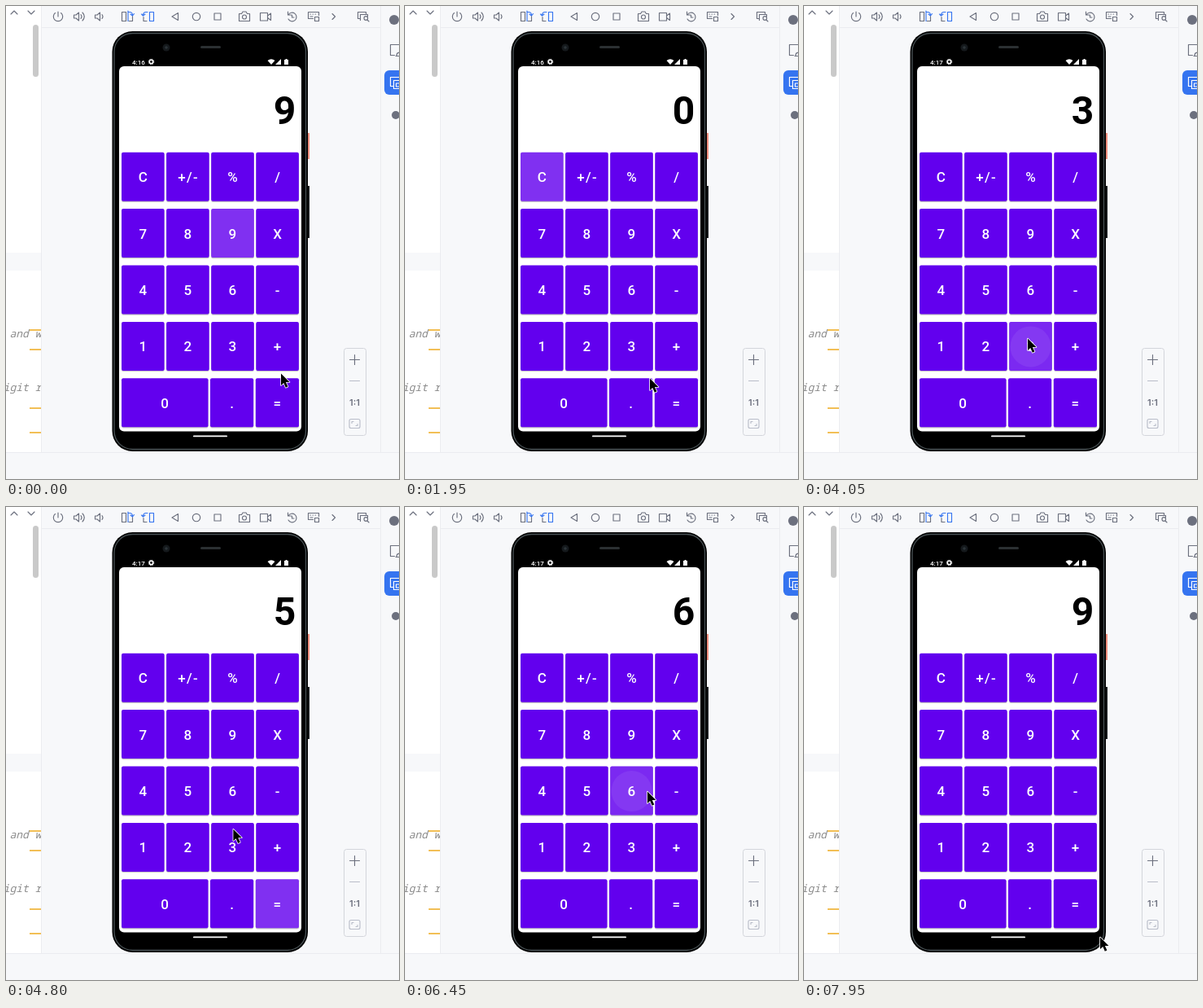
Write an HTML page that moves like this. It is 483x581 px and loops after 8 s.

```html
<!DOCTYPE html>
<html lang="en">
<head>
<meta charset="utf-8">
<title>Calculator in an emulator</title>
<style>
  html, body { margin: 0; width: 100%; height: 100%; overflow: hidden; background: #f7f8fa; }
  svg { display: block; }
  .icon { fill: none; stroke: #6c707e; stroke-width: 1.15; stroke-linecap: round; stroke-linejoin: round; }
  .blue { stroke: #3574f0; }
  .pale { stroke: #b9bdc9; }
  .code { font: italic 13px "Noto Sans Mono", monospace; fill: #8c8c8c; }
  .key { font: 500 17px Roboto, sans-serif; letter-spacing: 1.3px; fill: #fff; text-anchor: middle; }
  #display { font: 700 48px Roboto, sans-serif; text-anchor: end; }
  #clock { font: 500 8px Roboto, sans-serif; fill: #fff; }
</style>
</head>
<body>
<svg width="483" height="581" viewBox="0 0 483 581">
  <!-- editor pane -->
  <path fill="#fff" d="M0 0h43v548H0z"/>
  <path fill="#f7f8fa" d="M0 303h43v22H0z"/>
  <path class="icon" d="M6 10l4-4 4 4M27 6l4 4 4-4"/>
  <rect x="33" y="23" width="7" height="64" rx="3.5" fill="#c9c9c9"/>
  <text class="code" x="4.5" y="407">and w</text>
  <text class="code" x="-3.3" y="473">igit r</text>
  <path stroke="#f2bf56" stroke-width="2" d="M29 398h14M29 422h14M29 494h14M29 524h14"/>
  <path fill="#f7f8fa" d="M43 0h440v581H43z"/>
  <path fill="none" stroke="#ebecf0" d="M43.5 0v548M43 26.5h417M460.5 0v548M0 548.5h483"/>

  <!-- toolbar -->
  <g class="icon">
    <path d="M64 7v6M60.5 8.5a5.7 5.7 0 1 0 7 0"/>
    <path d="M83.5 11h2.500l3.500-3v10l-3.500-3h-2.500zM92 10.500q2 2.500 0 5M94 8q4.500 5 0 10"/>
    <path d="M109.500 11h2.500l3.500-3v10l-3.500-3h-2.500zM118 10.500q2 2.500 0 5"/>
    <path d="M142.500 7.500h5v11h-5zM151 18.500h4.500v-6"/>
    <path class="blue" d="M150 7.500h2q3.500 0 3.500 4M153 10l2.500 2 2-2.500M150 6v12.500"/>
    <path d="M173 18.500h-4v-5"/>
    <path class="blue" d="M174 7.500h-2q-3.500 0-3.500 4M166.500 10l2 2 2.500-2M176.500 7.500h5v11h-5z"/>
    <path d="M211.500 8.500v9l-7.500-4.500z"/>
    <circle cx="234" cy="13" r="4.700"/>
    <rect x="256" y="9" width="8" height="8"/>
    <path d="M286.500 9.500h3l1.500-2.500h4l1.500 2.500h3v9h-13z"/><circle cx="293" cy="13.500" r="2.500"/>
    <path d="M312.500 8.500h9v9.500h-9zM321.500 12l4-3v8.500l-4-3"/>
    <path d="M346.500 7v4h4M347 11a5.300 5.300 0 1 1 0 5M351.500 11v3h2.500"/>
    <path d="M371.500 7.500h13v4M371.500 7.500v8h6M374 10h.5M377 10h.5M380 10h.5M374 13h3M379.500 13.500h5v5h-5z"/>
    <path d="M401 9.500l3.500 3.500-3.500 3.500"/>
    <path d="M435 15.500h-2.500v-8h10v2M435.500 17.500v-7h9v2M440 15a2.300 2.300 0 1 0 4.600 0a2.300 2.300 0 1 0-4.600 0M444 17l2 2"/>
  </g>

  <!-- side strip -->
  <circle cx="477" cy="17" r="6" fill="#6c707e"/>
  <path class="icon" d="M483 47.500h-10.500v13h5M480 61q0-4 4-4M479 61.500h5"/>
  <rect x="465" y="79" width="30" height="30" rx="6" fill="#3574f0"/>
  <path class="icon" style="stroke:#fff" d="M483 87.500h-10.500v11h3M476.500 91.500h8M476.500 91.500v10h8M479.500 95h5v4h-5z"/>
  <circle cx="479" cy="134" r="5" fill="#6c707e"/>

  <!-- zoom panel -->
  <rect x="415.500" y="420.500" width="27" height="107" rx="3" fill="#f7f8fa" stroke="#d3d5db"/>
  <path class="icon" d="M422.500 434.500h12M428.500 428.500v12"/>
  <path class="icon pale" d="M422.500 460.500h12M424 507.500h9q2 0 2 2v7q0 2-2 2h-9q-2 0-2-2v-7q0-2 2-2M425 512.500v-2h2M432 513.500v2h-2"/>
  <text x="428.500" y="491" text-anchor="middle" style="font:600 11px Inter,sans-serif" fill="#6c707e">1:1</text>

  <!-- phone -->
  <path fill="#ef8d7c" d="M370 156h3v32h-3z"/>
  <path fill="#16191a" d="M370 221h3v64h-3z"/>
  <rect x="130.500" y="31" width="240.500" height="516" rx="25"/>
  <rect x="133" y="33.500" width="235.500" height="511" rx="22.500" fill="none" stroke="#485154" stroke-width="1.300"/>
  <circle cx="197" cy="51" r="4.500" fill="#15191c"/><circle cx="197" cy="51" r="1.800" fill="#2c3438"/>
  <rect x="239" y="49" width="25" height="3" rx="1.500" fill="#2b3032"/>
  <rect x="139" y="74" width="224" height="448.500" rx="6" fill="#fff"/>
  <rect x="230" y="527.500" width="42" height="1.800" rx=".9" fill="#fff"/>
  <text id="clock" x="155" y="71.500"></text>
  <circle cx="178.500" cy="68.500" r="2.200" fill="none" stroke="#fff" stroke-width="1.500"/>
  <circle cx="178.500" cy="68.500" r="3.300" fill="none" stroke="#fff" stroke-dasharray="1.300 1.290"/>
  <path fill="#fff" d="M321.500 67q4.500-3.500 9 0l-4.500 5zM338 65v7h-7zM342 66h1.500v-1h2v1h1.500v6h-5z"/>
  <text id="display" x="356.300" y="145"></text>
  <g id="keys"></g>
  <path id="cursor" d="M1 .5v14.500l3.300-3 2.500 5.700 2.600-1.200-2.500-5.500h4.600z" stroke="#fff" stroke-width="1.600" stroke-linejoin="round" paint-order="stroke"/>
</svg>

<script>
const STEP = 150, LOOP = 8000, FADE_STEPS = 4;
const get = id => document.getElementById(id);

function add(parent, tag, attrs, text = '') {
  const el = document.createElementNS('http://www.w3.org/2000/svg', tag);
  for (const name in attrs) el.setAttribute(name, attrs[name]);
  el.textContent = text;
  return parent.appendChild(el);
}

const keys = {};
function addKey(label, x, row, width) {
  const y = 179.7 + row * 69.4;
  const g = add(get('keys'), 'g', {});
  const box = { x, y, width, height: 60, rx: 2 };
  const cx = x + width / 2, cy = y + 30.5;
  add(g, 'rect', { ...box, y: y + 1.2, fill: '#000', opacity: .22 });
  add(g, 'rect', { ...box, fill: '#6200ee' });
  const glow = add(g, 'rect', { ...box, fill: '#fff' });
  const ripple = add(g, 'circle', { cx, cy, r: 25, fill: '#fff' });
  add(g, 'text', { class: 'key', x: cx + .6, y: Math.round(y + 36.5) }, label);
  keys[label] = { glow, ripple, x: cx, y: cy };
}
['C +/- % /', '7 8 9 X', '4 5 6 -', '1 2 3 +'].forEach((line, row) =>
  line.split(' ').forEach((label, col) => addKey(label, 142 + col * 55.1, row, 52.6)));
addKey('0', 142, 4, 106.5);
addKey('.', 251, 4, 53.2);
addKey('=', 306.8, 4, 53.2);

// The cursor glides from stop to stop; a stop with "show" presses its key.
const stops = [
  { at: -2, key: '9', show: '9' },
  { at: 0, x: 337, y: 451 },
  { at: 5, key: '=', show: '90' },
  { at: 8, key: 'C' },
  { at: 11, key: 'C', show: '0' },
  { at: 13, x: 300, y: 457 },
  { at: 18, key: '2', show: '2' },
  { at: 22, key: '+', show: '2' },
  { at: 26, key: '3', show: '3' },
  { at: 27, x: 274, y: 408 },
  { at: 30, key: '=', show: '5' },
  { at: 36, key: 'C', show: '0' },
  { at: 37, x: 175, y: 228 },
  { at: 42, key: '6', show: '6' },
  { at: 45, key: '-', show: '6' },
  { at: 48, x: 276, y: 274 },
  { at: 49, key: '9', show: '9' },
  { at: 52, x: 229, y: 280 },
  { at: 53, x: 363, y: 528 }
].map(stop => ({ ...keys[stop.key], ...stop }));
const presses = stops.filter(stop => stop.show);

function moveCursor(step) {
  const next = stops.findIndex(stop => stop.at >= step);
  const a = stops[next - 1], b = stops[next];
  const k = (step - a.at) / (b.at - a.at);
  get('cursor').setAttribute('transform', `translate(${a.x + (b.x - a.x) * k} ${a.y + (b.y - a.y) * k})`);
}

function draw() {
  const step = Math.floor(performance.now() % LOOP / STEP);
  for (const { glow, ripple } of Object.values(keys)) {
    glow.setAttribute('opacity', 0);
    ripple.setAttribute('opacity', 0);
  }
  for (const { at, glow, ripple, show } of presses) {
    const age = step - at;
    if (age < 0) break;
    get('display').textContent = show;
    if (age < FADE_STEPS) {
      glow.setAttribute('opacity', age < 3 ? .13 + .03 * age : .09);
      ripple.setAttribute('opacity', age < 2 ? .07 : 0);
    }
  }
  get('clock').textContent = step < 13 ? '4:16' : step < 16 ? '4:16' : '4:17';
  moveCursor(step);
  requestAnimationFrame(draw);
}
draw();
</script>
</body>
</html>
```
